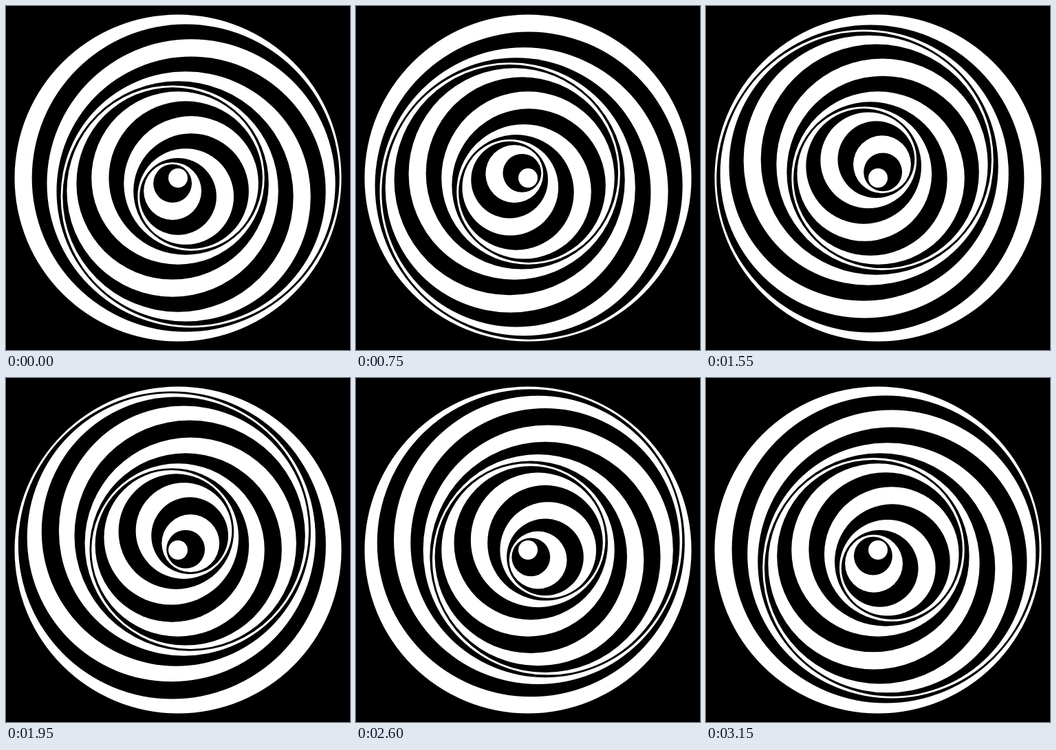
These frames come from a looping animation (500 by 500 pixels, 3.2 s). An HTML page with a canvas:

```html
<!DOCTYPE html>
<html>
<head>
<meta charset="utf-8">
<style>
html, body { margin: 0; height: 100%; overflow: hidden; background: #000; }
canvas { display: block; }
</style>
</head>
<body>
<canvas id="stage" width="500" height="500"></canvas>
<script>
const ctx = document.getElementById('stage').getContext('2d');
const LOOP = 3200, TICK = 50, DISCS = 17;
const STEP = 237.5 / DISCS;
const SHIFT = STEP * 0.8;

function draw(time) {
  ctx.fillStyle = '#000';
  ctx.fillRect(0, 0, 500, 500);
  let angle = Math.floor(time % LOOP / TICK) * TICK / LOOP * 2 * Math.PI;
  let x = 250, y = 250;
  // Each disc's centre steps an eighth turn further around an octagon.
  for (let i = 0; i < DISCS; i++) {
    ctx.fillStyle = i % 2 ? '#000' : '#fff';
    ctx.beginPath();
    ctx.arc(x, y, STEP * (DISCS - i), 0, 2 * Math.PI);
    ctx.fill();
    x += SHIFT * Math.cos(angle);
    y += SHIFT * Math.sin(angle);
    angle += Math.PI / 4;
  }
}

function frame() {
  draw(performance.now());
  requestAnimationFrame(frame);
}
frame();
</script>
</body>
</html>
```
